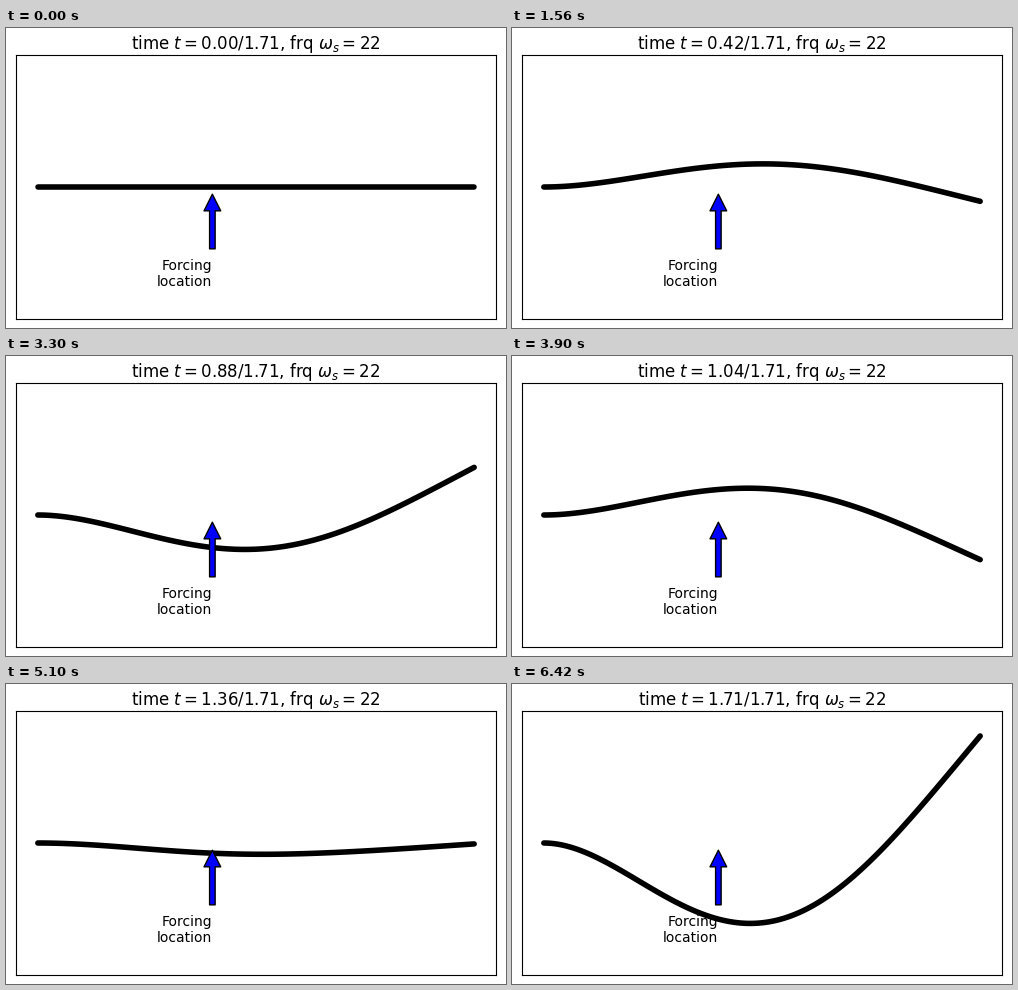
A matplotlib script for the animation above (6.45 s loop, 500 by 300 pixels).

```python
import numpy as np
import matplotlib.pyplot as plt
from matplotlib.animation import FuncAnimation

FRAMES = 215
OMEGA = 22.0                      # forcing frequency
T_END = 6 * 2 * np.pi / OMEGA     # six forcing periods
X_FORCE = 0.4
BETAS = np.array([1.875104, 4.694091, 7.854757, 10.995541, 14.137168])


def mode(beta, x):
    """Unit-norm bending mode of a clamped-free beam."""
    s = (np.cosh(beta) + np.cos(beta)) / (np.sinh(beta) + np.sin(beta))
    bx = beta * x
    return np.cosh(bx) - np.cos(bx) - s * (np.sinh(bx) - np.sin(bx))


def simulate(times):
    """Modal amplitudes from rest, average-acceleration Newmark scheme."""
    dt = times[1] - times[0]
    k = BETAS ** 4
    load = np.array([mode(b, X_FORCE) for b in BETAS])
    q, v, a = np.zeros((3, len(BETAS)))
    out = [q]
    for t in times[1:]:
        guess = q + dt * v + dt ** 2 / 4 * a
        a_new = (load * np.sin(OMEGA * t) - k * guess) / (1 + k * dt ** 2 / 4)
        q = guess + dt ** 2 / 4 * a_new
        v = v + dt / 2 * (a + a_new)
        a = a_new
        out.append(q)
    return np.array(out)


times = np.linspace(0, T_END, FRAMES)
x = np.linspace(0, 1, 121)
shapes = np.array([mode(b, x) for b in BETAS])
w = simulate(times) @ shapes
w /= np.abs(w).max()

fig = plt.figure(figsize=(5, 3), dpi=100)
ax = fig.add_axes([0.02, 0.03, 0.96, 0.88])
ax.set(xlim=(-0.05, 1.05), ylim=(-1.2, 1.2), xticks=[], yticks=[])
beam, = ax.plot(x, w[0], "k", lw=4, solid_capstyle="round")
ax.annotate("Forcing\nlocation", xy=(X_FORCE, 0), xytext=(X_FORCE, -0.9),
            ha="right", arrowprops=dict(facecolor="blue", shrink=0.1))
title = ax.set_title("", pad=4.2)


def update(i):
    beam.set_ydata(w[i])
    title.set_text(rf"time $t={times[i]:.2f}/{T_END:.2f}$, "
                   rf"frq $\omega_s={OMEGA:.0f}$")
    return beam, title


anim = FuncAnimation(fig, update, frames=FRAMES, interval=30,
                     repeat=True, repeat_delay=0)
plt.show()
```
